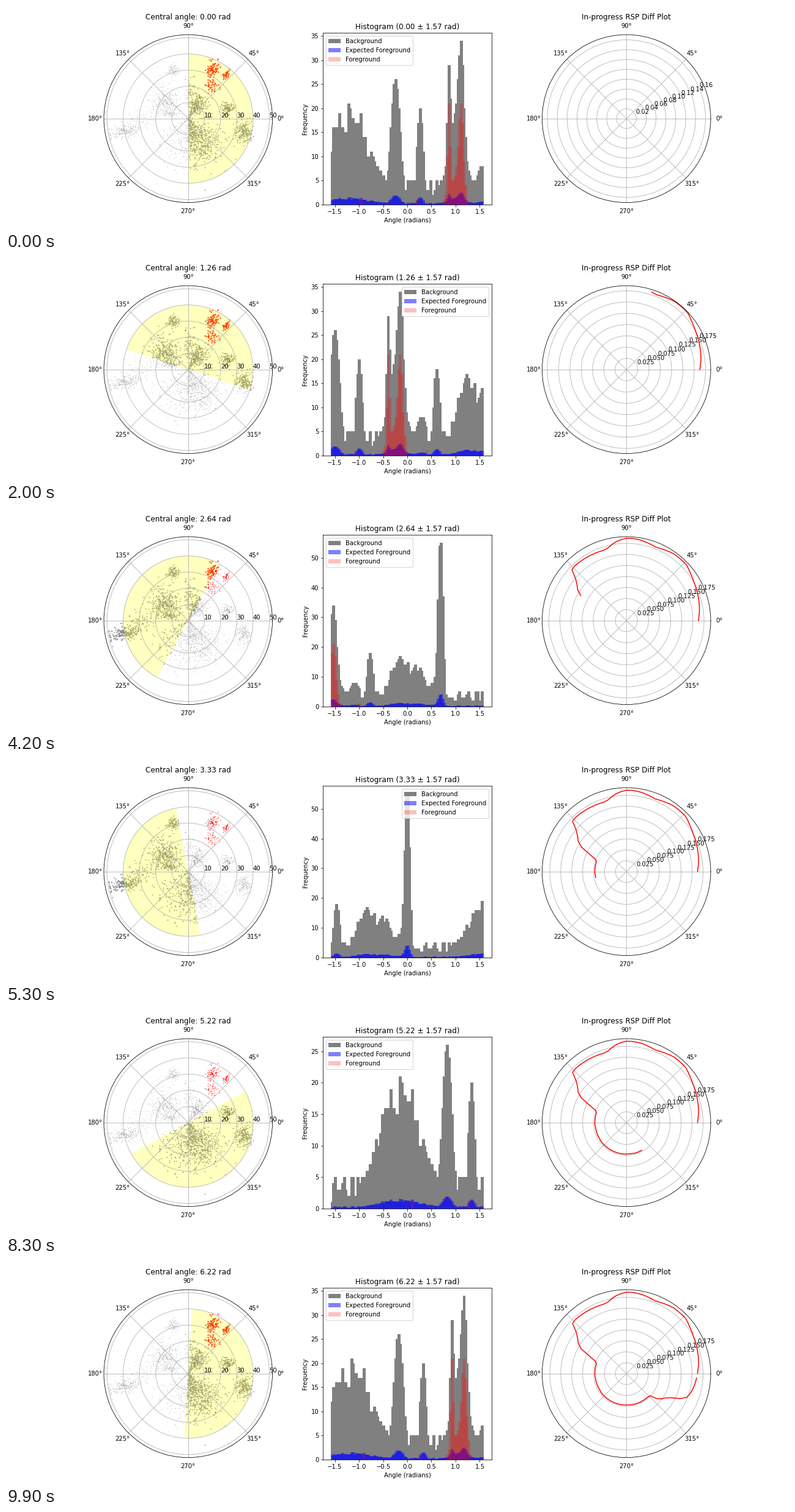
Animation of 1280x366 px, one loop 10000 ms. Source, as a matplotlib script:

```python
import numpy as np
import matplotlib.pyplot as plt
from matplotlib.animation import FuncAnimation
from matplotlib.collections import PolyCollection
from matplotlib.patches import Patch

FRAMES = 100
BINS = 200                      # angular bins around the full circle
STEP = 2 * np.pi / BINS
HALF = np.pi / 2
rng = np.random.default_rng(7)

# Point clusters: centre bin, width in bins, peak count, mean radius, spread
BG_CLUSTERS = [
    (-39, 14, 18, 15, 7.5), (-8, 2.8, 24.4, 35, 2.5), (8, 1.8, 20, 25, 2),
    (33, 6, 13.5, 10, 4), (49, 3, 8, 16, 6), (59, 1.8, 18, 31.5, 1.8),
    (80, 8, 15, 18, 5.5), (92, 3, 8, 15, 6), (101, 3, 7, 31, 5),
    (105.6, 1.5, 55, 41, 5.5),
]
FG_CLUSTERS = [(27, .8, 18, 36, 1.3), (31, 3.5, 5, 25, 3), (35, 1.6, 18, 34, 2.6)]
STRAYS = [(-31, 29), (6, 26), (52, 24.5)]       # bin, radius

# Difference while the whole foreground is in the window: (degrees, value)
CREST = [(-20, .151), (-12, .157), (0, .163), (31, .176), (43, .186),
         (55, .186), (68, .1797), (80, .186), (89, .188), (96, .183),
         (106, .1685), (138, .172)]
REST = .0715


def shares(clusters):
    """Expected count of every cluster in every bin."""
    rows = []
    for centre, width, peak, *_ in clusters:
        gap = (np.arange(BINS) - centre + BINS / 2) % BINS - BINS / 2
        row = peak * np.exp(-.5 * (gap / width) ** 2)
        if width > 6:
            row *= rng.uniform(.75, 1.2, BINS)
        rows.append(row)
    return np.array(rows)


def scatter_points(counts, parts, clusters):
    pts = []
    weights = parts / parts.sum(axis=0)
    for m, n in enumerate(counts):
        for pick in rng.choice(len(clusters), int(n), p=weights[:, m]):
            radius = abs(rng.normal(*clusters[pick][3:]))
            pts.append(((m + rng.random()) * STEP, min(radius, 49.3)))
    return pts


bg_parts = shares(BG_CLUSTERS)
fg_parts = shares(FG_CLUSTERS)
fg = np.round(fg_parts.sum(axis=0))
plain = np.maximum(np.round(bg_parts.sum(axis=0)), rng.integers(1, 6, BINS))
bg_pts = np.array(scatter_points(plain, bg_parts, BG_CLUSTERS))
fg_pts = scatter_points(fg, fg_parts + 1e-9, FG_CLUSTERS)
for m, radius in STRAYS:
    fg[m] += 1
    fg_pts.append(((m + .5) * STEP, radius))
fg_pts = np.array(fg_pts)
bg = plain + fg
expected = .073 * bg

windows = (2 * np.arange(FRAMES)[:, None] - 50 + np.arange(100)) % BINS
theta = np.arange(FRAMES) * 2 * np.pi / FRAMES
signed = (np.degrees(theta) + 90) % 360 - 90
crest = np.interp(signed, *np.transpose(CREST))
diff = REST + (crest - REST) * fg[windows].sum(axis=1) / fg.sum()

fig = plt.figure(figsize=(1280 / 72, 366 / 72), dpi=72)
fig.subplots_adjust(wspace=.3)
ax_pts = fig.add_subplot(131, projection="polar")
ax_hist = fig.add_subplot(132)
ax_diff = fig.add_subplot(133, projection="polar")


def dots(pts, color, size, alpha=1):
    return ax_pts.scatter(*pts.T, s=size, c=color, alpha=alpha, linewidths=0)


dots(bg_pts, "gray", 1.7, .4)
dots(fg_pts, "red", 2.5, .7)
bg_live = dots(bg_pts, "gray", 3)
fg_live = dots(fg_pts, "red", 4.5)
wedge, = ax_pts.fill([0, 1, 2], [0, 40, 40], color="yellow", alpha=.25, lw=0)
ax_pts.set_ylim(0, 51.9)
ax_pts.set_yticks([10, 20, 30, 40, 50])
ax_pts.set_rlabel_position(0)

# Bars are two bins wide, so neighbours overlap
centers = -HALF + (np.arange(100) + .5) * STEP
layers, keys = [], []
for label, color, alpha, key_alpha in [("Background", "gray", 1, 1),
                                       ("Expected Foreground", "blue", .5, .5),
                                       ("Foreground", "red", .25, .25)]:
    layer = PolyCollection([], facecolors=color, alpha=alpha, linewidths=0)
    layer.set_snap(True)
    ax_hist.add_collection(layer, autolim=False)
    layers.append(layer)
    keys.append(Patch(facecolor=color, alpha=key_alpha, lw=0, label=label))
edge = HALF + STEP / 2
ax_hist.set_xlim(-1.1 * edge, 1.1 * edge)
ax_hist.set_xlabel("Angle (radians)")
ax_hist.set_ylabel("Frequency")
legend = ax_hist.legend(handles=keys, loc="upper left")

curve, = ax_diff.plot([], [], color="red", lw=1.5)
ax_diff.set_title("In-progress RSP Diff Plot")


def bars(heights):
    verts = np.zeros((len(centers), 4, 2))
    verts[:, :2, 0] = (centers - STEP)[:, None]
    verts[:, 2:, 0] = (centers + STEP)[:, None]
    verts[:, 1:3, 1] = heights[:, None]
    return verts


def inside(pts, angle):
    rel = (pts[:, 0] - angle + np.pi) % (2 * np.pi) - np.pi
    return pts[np.abs(rel) <= HALF]


def draw(i):
    angle = theta[i]
    ax_pts.set_title(f"Central angle: {angle:.2f} rad")
    bg_live.set_offsets(inside(bg_pts, angle))
    fg_live.set_offsets(inside(fg_pts, angle))
    arc = np.linspace(angle - HALF, angle + HALF, 121)
    wedge.set_xy([(angle, 0)] + [(a, 40) for a in arc])

    window = windows[i]
    for layer, data in zip(layers, (bg, expected, fg)):
        layer.set_verts(bars(data[window]))
    top = 1.05 * bg[window].max()
    ax_hist.set_ylim(0, top)
    ax_hist.set_title(f"Histogram ({angle:.2f} ± 1.57 rad)")

    # The legend takes the corner that hides fewer tall bars
    tall = bg[window] > .807 * top
    left = np.sum(tall & (centers - STEP < .16))
    right = np.sum(tall & (centers + STEP > -.15))
    legend.set_loc("upper left" if left < right else "upper right")

    seen = diff[:i + 1]
    curve.set_data(theta[:i + 1], seen)
    spread = np.ptp(seen) if i else seen[0]
    limit = seen.max() + .05 * spread
    tick = .02 if limit <= .18 else .025
    ax_diff.set_ylim(0, limit)
    ax_diff.set_yticks(np.arange(tick, limit, tick))
    return ()


anim = FuncAnimation(fig, draw, frames=FRAMES, interval=100, repeat=True,
                     init_func=lambda: draw(0))
plt.show()
```
